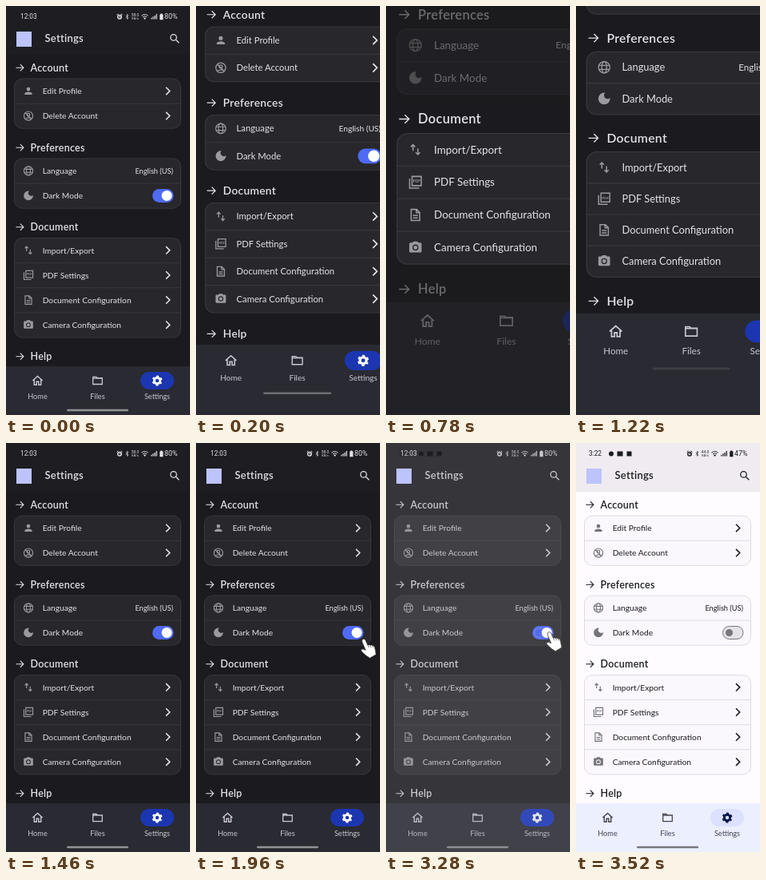
These frames come from a looping animation (230 px wide and 512 px high, 4.36 s). An HTML page:

```html
<!DOCTYPE html>
<html lang="en">
<head>
<meta charset="utf-8">
<title>Settings theme switch</title>
<style>
html, body { margin: 0; width: 100%; height: 100%; overflow: hidden; background: #1b1b1f; }
svg { display: block; width: 230px; height: 512px; }
text { font-family: Lato, "Open Sans", sans-serif; fill: var(--ink); }
.dark {
  --bg: #1b1b1f; --head: #1d1d22; --card: #27272c; --edge: #37373c; --ink: #e4e2e6;
  --icon: #9b9b9f; --nav: #2a2a32; --navInk: #c8c7d0; --pill: #1b36b0; --gear: #fff;
  --logo: #bcc4fb; --bar: #929297;
}
.light {
  --bg: #fefcff; --head: #efebf0; --card: #faf8fd; --edge: #dddce6; --ink: #1b1b1f;
  --icon: #747479; --nav: #ebeffe; --navInk: #45464f; --pill: #dbe1ff; --gear: #00174b;
  --logo: #bcc4fb; --bar: #77777c;
}
.line { fill: none; stroke: currentColor; stroke-width: 2; }
.title { font-weight: 600; letter-spacing: .25px; }
.status text { font-family: Roboto, "Noto Sans", sans-serif; }
</style>
</head>
<body>
<svg viewBox="0 0 230 512">
  <g id="view">
    <g id="dark" class="dark"></g>
    <path id="dim" fill="#1b1b1f" fill-rule="evenodd" d="M-5 -5H400V720H-5ZM-5 262H400V418H-5Z"/>
  </g>
  <g id="hand">
    <path d="M.2 1.2C1.6-.6 3.6 0 4.4 1.7L7.2 7.8Q8.800 6.600 10.200 8Q11.800 6.900 13 8.400Q15.200 8 15.900 10.500L16.800 14.500L17.600 19.600L9.800 24.200Q5 21.500 .8 17.200L-1.400 14.600Q-1 12.200 1.600 12.800L4.300 14.200L.2 4.200Q-.5 2.400 .2 1.200Z" fill="#fff" stroke="#222" stroke-width=".8" stroke-linejoin="round"/>
    <path d="M7.2 7.8l1.400 3M10.200 8l1.200 2.800M13 8.400l1 2.400" fill="none" stroke="#222" stroke-width=".6"/>
  </g>
  <g id="light" class="light"></g>
</svg>
<script>
const $ = id => document.getElementById(id);

// Icons on a 24-unit grid
const icons = {
  person: '<path d="M12 12a4 4 0 1 0 0-8a4 4 0 0 0 0 8zm0 2c-2.7 0-8 1.3-8 4v2h16v-2c0-2.7-5.3-4-8-4z"/>',
  remove: '<g class="line"><circle cx="12" cy="12" r="9.5"/><circle cx="12" cy="9.5" r="3"/><path d="M5.5 18.5q6.5-5 13 0M5 5l14 14"/></g>',
  globe: '<g class="line" style="stroke-width:1.8"><circle cx="12" cy="12" r="9.7"/><ellipse cx="12" cy="12" rx="4.2" ry="9.7"/><path d="M3 8.6h18M3 15.4h18"/></g>',
  moon: '<path d="M12 2a10 10 0 1 0 10 10c0-.5 0-.9-.1-1.4a5.8 5.8 0 1 1-8.4-8.5C13 2 12.5 2 12 2z"/>',
  swap: '<path class="line" d="M8 14V4M4.5 7.5L8 4l3.5 3.5M16 10v10M12.5 16.5L16 20l3.5-3.5"/>',
  pdf: '<path class="line" d="M6.5 2.5H21.5V17.5H6.5ZM2.5 6V21.5H18"/><text x="14" y="12.5" font-size="6" font-weight="700" text-anchor="middle" style="fill:currentColor">PDF</text>',
  doc: '<path class="line" d="M5 3h9l5 5v13H5ZM13.5 3v5.5H19M8 13h8M8 17h8"/>',
  camera: '<path fill-rule="evenodd" d="M9 2L7.2 4H4a2 2 0 0 0-2 2v12a2 2 0 0 0 2 2h16a2 2 0 0 0 2-2V6a2 2 0 0 0-2-2h-3.2L15 2zM12 7a5 5 0 1 1 0 10a5 5 0 1 1 0-10z"/><circle cx="12" cy="12" r="3.2"/>',
  home: '<path class="line" style="stroke-width:2.2" d="M2.5 12L12 3.5L21.5 12M5.5 10v10h4.5v-6h4v6h4.5V10"/>',
  folder: '<path class="line" d="M3 5h6.5l2 2H21V19H3ZM3 7.500H21"/>',
  gear: '<circle class="line" cx="12" cy="12" r="5.7" style="stroke-width:4.500"/><circle class="line" cx="12" cy="12" r="8.500" pathLength="60" stroke-dasharray="5 5" stroke-dashoffset="2.500" transform="rotate(30 12 12)" style="stroke-width:3"/>',
  search: '<g class="line"><circle cx="9.5" cy="9.5" r="6"/><path d="M14 14l6.5 6.5"/></g>',
  arrow: '<path class="line" d="M3 12H20M13 4.5L20.5 12L13 19.5"/>',
  chevron: '<path class="line" style="stroke-width:2.5" d="M8 4.5L15.5 12L8 19.5"/>',
  alarm: '<circle class="line" style="stroke-width:4" cx="12" cy="13" r="7"/><path class="line" style="stroke-width:3" d="M2 6l5-4M22 6l-5-4M12 9v4h4"/>',
  bluetooth: '<path class="line" d="M6 7l11 10l-5 5V2l5 5L6 17"/>',
  wifi: '<path class="line" style="stroke-width:2.5" d="M1 9q11-9 22 0M5 13.5q7-6 14 0"/><path d="M8 17q4-3 8 0l-4 5z"/>',
  signal: '<path class="line" style="stroke-width:3.5" d="M3 21v-5M9 21v-9M15 21V8M21 21V3"/>',
  battery: '<path d="M9 1h6v3h3v19H6V4h3z"/>'
};
const icon = (name, x, y, size = 14, color = 'var(--icon)') =>
  `<g transform="translate(${x - size / 2} ${y - size / 2}) scale(${size / 24})" style="color:${color}" fill="${color}">${icons[name]}</g>`;
const text = (s, x, y, size, extra = '') =>
  `<text x="${x}" y="${y + size * .36}" font-size="${size}" ${extra}>${s}</text>`;
const rect = (x, y, w, h, fill, extra = '') =>
  `<rect x="${x}" y="${y}" width="${w}" height="${h}" fill="var(--${fill})" ${extra}/>`;

const sections = [
  ['Account', 77.3, [['person', 'Edit Profile'], ['remove', 'Delete Account']]],
  ['Preferences', 177.2, [['globe', 'Language'], ['moon', 'Dark Mode']]],
  ['Document', 276.7, [['swap', 'Import/Export'], ['pdf', 'PDF Settings'],
    ['doc', 'Document Configuration'], ['camera', 'Camera Configuration']]],
  ['Help', 438.8, []]
];
const rowH = 31.1;

function toggle(y, dark) {
  return dark
    ? `<rect x="183" y="${y - 8.5}" width="26.5" height="17" rx="8.5" fill="#4f6af5"/><circle cx="201" cy="${y}" r="6.5" fill="#fff"/>`
    : `<rect x="183.5" y="${y - 8}" width="25.5" height="16" rx="8" fill="#e4e2e6" stroke="#77767d"/><circle cx="191.5" cy="${y}" r="4.5" fill="#77767d"/>`;
}

function section([title, y, rows], dark) {
  let out = icon('arrow', 17.3, y, 13, 'var(--ink)') + text(title, 30.5, y, 12.5, 'class="title"');
  if (!rows.length) return out;
  const top = y + 13.8;
  out += rect(10.5, top, 208, rows.length * rowH, 'card', 'rx="10" stroke="var(--edge)"');
  rows.forEach(([name, label], i) => {
    const cy = top + (i + .5) * rowH - .2;
    if (i) out += rect(10.5, top + i * rowH - .5, 208, 1, 'edge');
    out += icon(name, 28, cy) + text(label, 45.7, cy, 10.2);
    if (label === 'Language') out += text('English (US)', 209, cy, 9.2, 'text-anchor="end"');
    else if (label === 'Dark Mode') out += toggle(cy, dark);
    else out += icon('chevron', 202.5, cy, 15, 'var(--ink)');
  });
  return out;
}

function status(dark) {
  const ink = 'var(--ink)', mid = 'text-anchor="middle"';
  const notes = dark ? '' :
    `<circle cx="44" cy="13.5" r="3" fill="${ink}"/>` + rect(51.5, 10.5, 7, 6, 'ink') + rect(63.5, 10.5, 6, 6, 'ink');
  return '<g class="status">' +
    text(dark ? '12:03' : '3:22', dark ? 18 : 16, 13.2, 8.3) + notes +
    icon('alarm', 142, 13.3, 8, ink) + icon('bluetooth', 151.5, 13.3, 7.5, ink) +
    text(dark ? '58.0' : '44.0', 161.5, 11.4, 4.8, mid) + text('KB/s', 161.5, 15.6, 4, mid) +
    icon('wifi', 173.5, 13.3, 9, ink) + icon('signal', 185, 13.3, 8.5, ink) + icon('battery', 194.3, 13.3, 8.5, ink) +
    text(dark ? '80%' : '47%', 198, 13.2, 8.8) + '</g>';
}

function tab(name, label, x, color) {
  return icon(name, x, 469, 15.5, color) +
    text(label, x, 488.5, 9.2, 'text-anchor="middle" style="fill:var(--navInk)"');
}

function screen(dark) {
  return rect(0, 0, 230, 512, 'bg') + rect(0, 0, 230, 61.5, 'head') + status(dark) +
    rect(13, 32, 19, 19, 'logo') +
    text('Settings', 48.5, 40.8, 13, 'class="title"') + icon('search', 211, 41, 15, 'var(--ink)') +
    sections.map(s => section(s, dark)).join('') +
    rect(0, 451, 230, 260, 'nav') + rect(168, 458, 42, 22, 'pill', 'rx="11"') +
    tab('home', 'Home', 39.5, 'var(--navInk)') + tab('folder', 'Files', 114.5, 'var(--navInk)') +
    tab('gear', 'Settings', 189, 'var(--gear)') +
    rect(76, 504.8, 77, 2.4, 'bar', 'rx="1.2" class="grip"');
}

$('dark').innerHTML = screen(true);
$('light').innerHTML = screen(false);
const grip = document.querySelector('#dark .grip');

const LOOP = 4360;
const ramp = (t, a, b) => Math.min(1, Math.max(0, (t - a) / (b - a)));
const inOut = u => u < .5 ? 2 * u * u : 1 - 2 * (1 - u) ** 2;
const out = u => 1 - (1 - u) ** 1.5;

function draw(t) {
  const zoom = inOut(ramp(t, 0, 490)) - inOut(ramp(t, 1120, 1460));
  $('view').setAttribute('transform', `translate(0 ${-222.1 * zoom}) scale(${1 + .314 * zoom})`);
  grip.setAttribute('opacity', 1 - zoom);
  $('dim').setAttribute('opacity', .61 * (inOut(ramp(t, 580, 800)) - inOut(ramp(t, 920, 1120))));

  // The hand slides in from the right, then taps the switch
  const away = 1 - inOut(ramp(t, 1580, 2120));
  const tap = 1 - .15 * Math.sin(Math.PI * ramp(t, 2120, 2460));
  $('hand').setAttribute('transform', `translate(${202 + 32 * away} ${236.5 + 50 * away}) scale(${tap})`);
  $('light').setAttribute('opacity', out(ramp(t, 3260, 3520)));
}

const start = performance.now();
function tick() {
  draw((performance.now() - start) % LOOP);
  requestAnimationFrame(tick);
}
draw(0);
tick();
</script>
</body>
</html>
```
